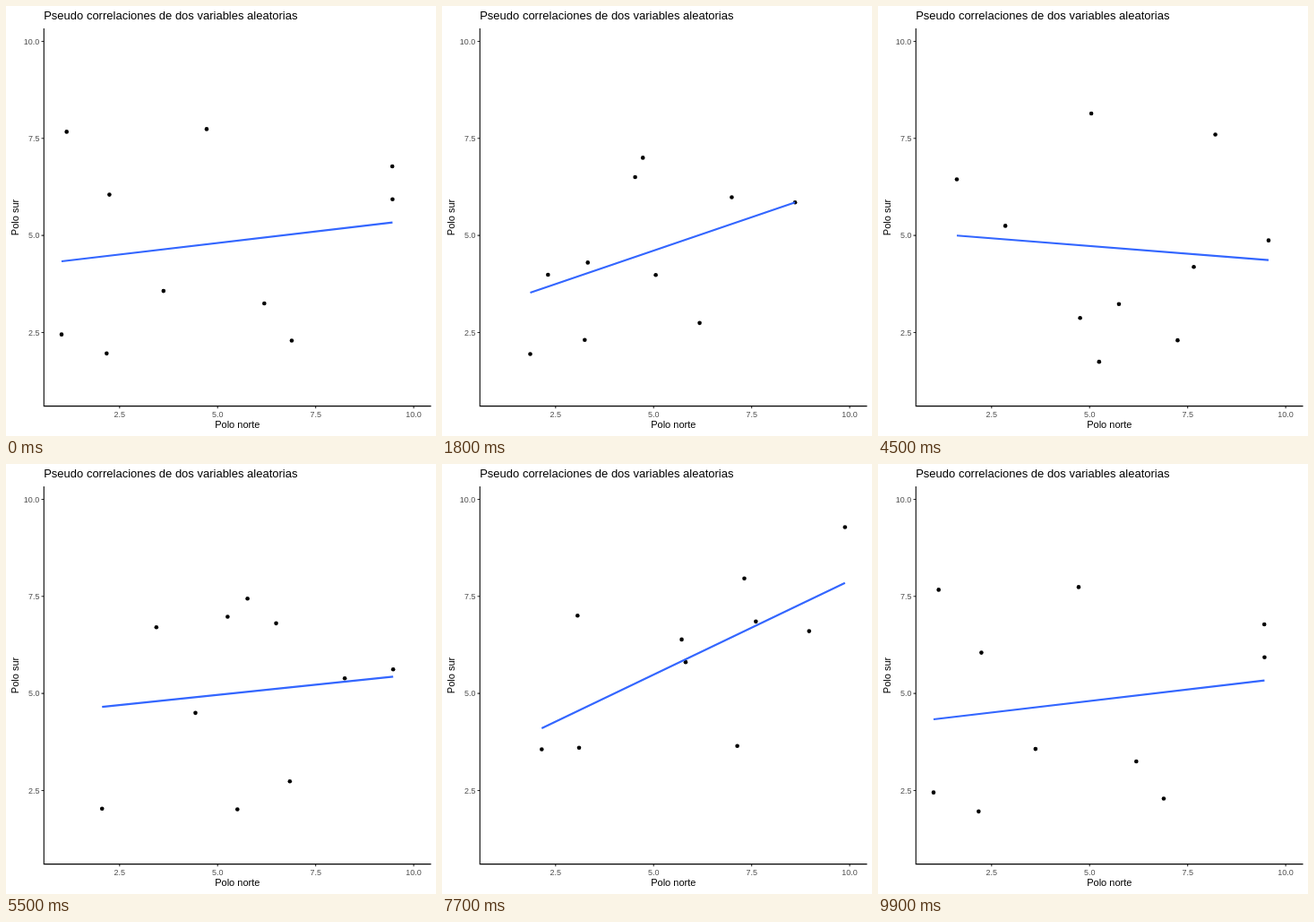
These frames come from a looping animation (480x480 px, 10000 ms). An HTML page:

```html
<!DOCTYPE html>
<html lang="es">
<head>
<meta charset="utf-8">
<title>Pseudo correlaciones</title>
<style>
  html, body { margin: 0; width: 100%; height: 100%; overflow: hidden; background: #fff; }
  svg { display: block; width: 480px; height: 480px; }
  text { font: 11px "Liberation Sans", Arial, sans-serif; }
  .mid { text-anchor: middle; }
  .title { font-size: 13px; }
  .tick text { font-size: 9px; fill: #4d4d4d; }
  .tick path { stroke: #333; stroke-width: 1.07; }
</style>
</head>
<body>
<svg viewBox="0 0 480 480">
  <text class="title" x="42.2" y="15">Pseudo correlaciones de dos variables aleatorias</text>
  <text class="mid" x="258.3" y="471">Polo norte</text>
  <text class="mid" transform="translate(13.5 236) rotate(-90)">Polo sur</text>
  <g id="ticks" class="tick"></g>
  <g id="dots"></g>
  <path id="trend" fill="none" stroke="#36f" stroke-width="2.13"/>
  <path d="M42.3 25V446.6H474.5" fill="none" stroke="#000" stroke-width="1.07"/>
</svg>
<script>
const $ = id => document.getElementById(id);
const px = v => 17.36 + 43.774 * v;
const py = v => 472.8 - 43.335 * v;
const COUNT = 10, LOW = 1, HIGH = 10;

let seed = 11;
function rand() {
  seed = (seed * 16807) % 2147483647;
  return seed / 2147483647;
}
const mix = (a, b, k) => a.map((p, i) => p.map((v, j) => v + (b[i][j] - v) * k));
const mean = list => list.reduce((sum, v) => sum + v, 0) / list.length;

// Least-squares line as a function of x
function fit(points) {
  const mx = mean(points.map(p => p[0])), my = mean(points.map(p => p[1]));
  const slope = mean(points.map(([x, y]) => (x - mx) * (y - my))) /
    mean(points.map(([x]) => (x - mx) ** 2));
  return x => my + slope * (x - mx);
}

// A state is ten points followed by the two ends of their regression line
function withFit(points) {
  const line = fit(points), xs = points.map(p => p[0]);
  return [...points, ...[Math.min(...xs), Math.max(...xs)].map(x => [x, line(x)])];
}

// Random points whose regression line runs from (x0, y0) to (x1, y1)
function scatter([x0, y0, x1, y1]) {
  const trend = fit([[x0, y0], [x1, y1]]);
  let points, spread = HIGH - LOW;
  do {
    const raw = Array.from({ length: COUNT }, (_, i) =>
      [i < 2 ? [x0, x1][i] : x0 + (x1 - x0) * rand(), spread * rand()]);
    const bias = fit(raw);
    points = raw.map(([x, y]) => [x, y - bias(x) + trend(x)]);
    spread *= 0.998;
  } while (points.some(([, y]) => y < LOW || y > HIGH));
  return withFit(points);
}

const opening = withFit([
  [1.15, 7.67], [4.72, 7.74], [2.24, 6.05], [9.455, 6.78], [9.46, 5.93],
  [3.62, 3.57], [6.19, 3.25], [6.89, 2.29], [1.02, 2.45], [2.17, 1.96]]);

const trends = [
  [1.26, 4.2, 9.8, 4.9], [2.15, 3.19, 8.01, 6.33], [1.13, 8.43, 9.72, 2.14],
  [1.6, 4.9, 9.6, 4.2], [1.68, 5.48, 9.38, 5.2], [2.8, 3, 9.67, 5.9],
  [2.64, 4.43, 9.68, 6.48], [1.9, 3.94, 9.98, 8.53], [1.4, 6.2, 9.7, 4.6]];
const states = [opening, ...trends.map(scatter)];

// Time runs in 100 ms ticks; each state is reached every 9.9 ticks
function poseAt(tick) {
  const arrival = i => Math.round(9.9 * (i + 1));
  const i = states.findIndex((_, n) => tick <= arrival(n));
  const steps = i ? 6 : 7;
  const progress = Math.max(0, 1 - (arrival(i) - tick) / steps);
  return mix(states[i], states[(i + 1) % states.length], progress);
}

$("ticks").innerHTML = [2.5, 5, 7.5, 10].map(v => {
  const x = px(v), y = py(v), label = v.toFixed(1);
  return `<path d="M${x} 446.6v2.75M42.3 ${y}h-2.75"/>
    <text class="mid" x="${x}" y="458.5">${label}</text>
    <text text-anchor="end" x="37.4" y="${y + 3.2}">${label}</text>`;
}).join("");
$("dots").innerHTML = '<circle r="2.3"/>'.repeat(COUNT);
const dots = [...$("dots").children];

function draw(now) {
  const pose = poseAt(Math.floor(now % 10000 / 100)).map(([x, y]) => [px(x), py(y)]);
  dots.forEach((dot, i) => {
    dot.setAttribute("cx", pose[i][0]);
    dot.setAttribute("cy", pose[i][1]);
  });
  $("trend").setAttribute("d", `M${pose[COUNT]}L${pose[COUNT + 1]}`);
}

const begin = performance.now();
function loop() {
  draw(performance.now() - begin);
  requestAnimationFrame(loop);
}
loop();
</script>
</body>
</html>
```
